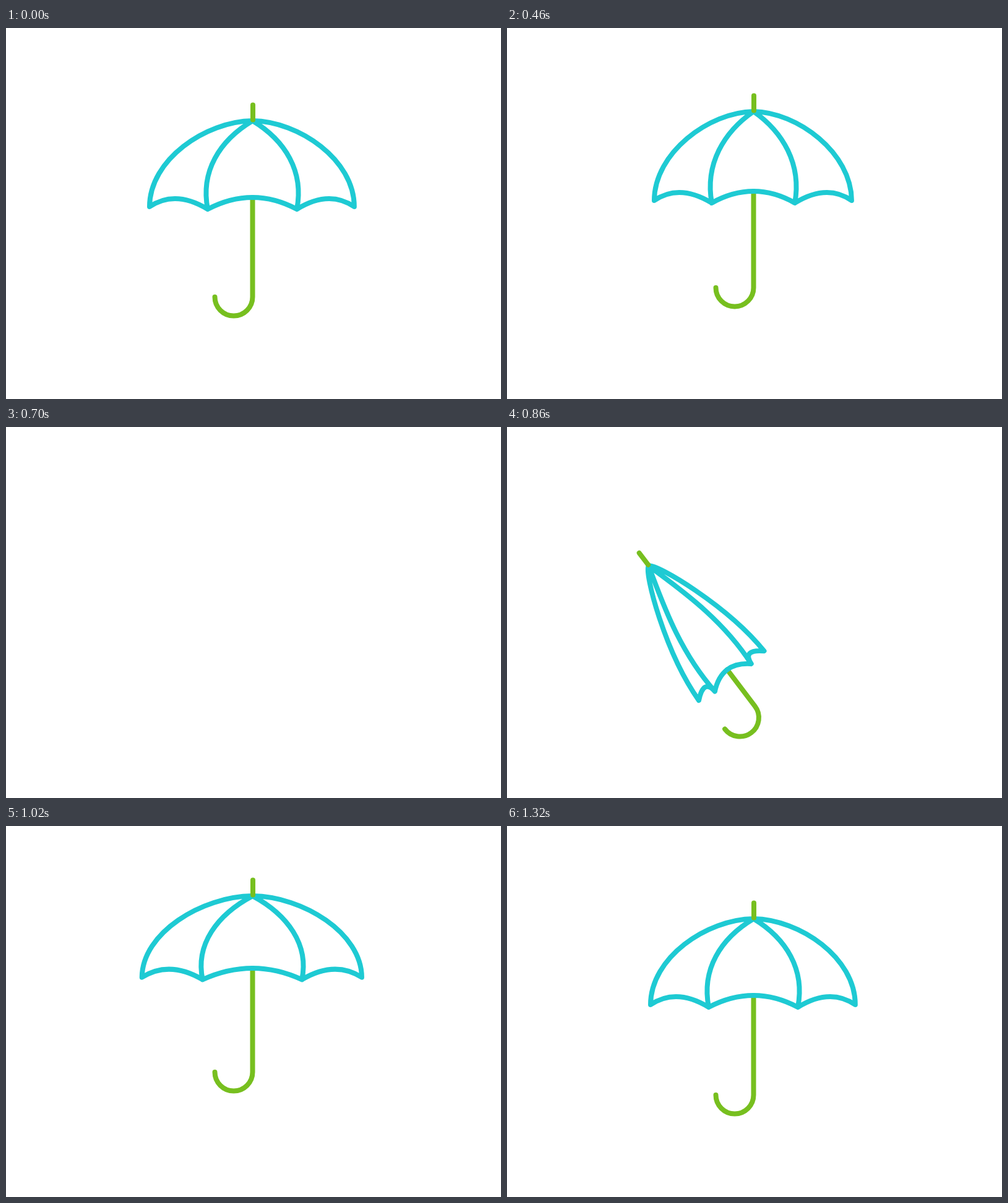
Recreate the animation shown at these times as an HTML page with a canvas. Size 800 by 600 pixels, loop 1.56 s.

```html
<!DOCTYPE html>
<html lang="en">
<head>
<meta charset="utf-8">
<title>Umbrella</title>
<style>
  html, body { margin: 0; width: 100%; height: 100%; overflow: hidden; background: #fff; }
  canvas { display: block; }
</style>
</head>
<body>
<canvas id="stage" width="800" height="600"></canvas>
<script>
const ctx = document.getElementById('stage').getContext('2d');
const LOOP = 1560, STEP = 20;
const BLUE = '#1ecad3', GREEN = '#77bf1f';
const APEX = { x: 398.5, y: 150 };
const HOOK = { x: -30.5, y: 285, r: 30.5 };
const PIVOT = { x: -30.5, y: 271 };

// Left half of the canopy, relative to its apex. Each pose lists:
// outer curve (2 controls, corner), rib (2 controls, end), side scallop control, middle scallop control y
const REST = [-76, 1, -166.5, 63, -166.5, 139, -53.5, 32, -84.5, 82, -72.5, 143, -125, 111, 105];
const WIDE = [-84, 1, -181, 59, -181.5, 130, -58, 30, -94, 78, -82, 133.5, -137, 102, 97];
const SHUT = [-45, 3, -116, 95, -117.5, 180, -30, 42, -60, 108, -51, 184, -83, 154, 149];

const mix = (a, b, p) => a + (b - a) * p;
const clamp = p => Math.max(0, Math.min(1, p));
const span = (t, a, b) => clamp((t - a) / (b - a));
const smooth = p => (1 - Math.cos(Math.PI * p)) / 2;
const glide = (t, t0, t1, a, b) => mix(a, b, smooth(span(t, t0, t1)));

// fold: 0 at rest, towards 1 closing, -1 fully spread
function stateAt(t) {
  if (t < 540) {
    const p = (t / 540) ** 3.4;
    return { dy: -26 * p, fold: 0.21 * p, tilt: 0 };
  }
  if (t < 700) {
    const p = span(t, 540, 700) ** 3;
    return { dy: mix(-26, 494, p), fold: glide(t, 540, 625, 0.21, -1), tilt: 0 };
  }
  if (t < 840) return null;
  const left = 1 - span(t, 820, 1000);
  const dy = t < 1000 ? -40 + 146 * left ** 2.5
    : t < 1120 ? glide(t, 1000, 1120, -40, 6.5)
    : glide(t, 1120, 1320, 6.5, 0);
  const fold = t < 940 ? 1 + 1.2 * Math.cos(Math.PI / 2 * span(t, 820, 940))
    : t < 1050 ? mix(1, -1, Math.sin(Math.PI / 2 * span(t, 940, 1050)))
    : t < 1120 ? glide(t, 1050, 1120, -1, 0.12)
    : glide(t, 1120, 1320, 0.12, 0);
  return { dy, fold, tilt: -62 * left ** 2.04 * Math.PI / 180 };
}

// the ribs draw together sooner than the rim
function poseAt(fold) {
  const goal = fold < 0 ? WIDE : SHUT;
  const p = Math.abs(fold), lead = p ** 0.7;
  const isRibX = i => i === 6 || i === 8 || i === 10;
  return REST.map((v, i) => mix(v, goal[i], isRibX(i) ? lead : p));
}

function stroke(color, trace) {
  ctx.strokeStyle = color;
  ctx.beginPath();
  trace();
  ctx.stroke();
}

function canopyHalf(k, side) {
  const q = k.map((v, i) => i % 2 || i === 14 ? v : v * side);
  const midY = (q[11] + q[14]) / 2;
  ctx.moveTo(0, 0);
  ctx.bezierCurveTo(...q.slice(0, 6));
  ctx.quadraticCurveTo(q[12], q[13], q[10], q[11]);
  ctx.moveTo(0, 0);
  ctx.bezierCurveTo(...q.slice(6, 12));
  ctx.quadraticCurveTo(q[10] / 2, midY, 0, midY);
}

function draw(t) {
  ctx.setTransform(1, 0, 0, 1, 0, 0);
  ctx.fillStyle = '#fff';
  ctx.fillRect(0, 0, 800, 600);
  const s = stateAt(t);
  if (!s) return;

  ctx.translate(APEX.x + PIVOT.x, APEX.y + PIVOT.y + s.dy);
  ctx.rotate(s.tilt);
  ctx.translate(-PIVOT.x, -PIVOT.y);
  ctx.lineWidth = 8;
  ctx.lineCap = ctx.lineJoin = 'round';

  const k = poseAt(s.fold);
  stroke(GREEN, () => {
    ctx.moveTo(0, (k[11] + k[14]) / 2);
    ctx.lineTo(0, HOOK.y);
    ctx.arc(HOOK.x, HOOK.y, HOOK.r, 0, Math.PI);
  });
  stroke(BLUE, () => {
    canopyHalf(k, 1);
    canopyHalf(k, -0.987);
  });
  stroke(GREEN, () => {
    ctx.moveTo(0.5, -25.5);
    ctx.lineTo(0.5, -1.5);
  });
}

const start = performance.now();
function tick() {
  const t = (performance.now() - start) % LOOP;
  draw(Math.floor(t / STEP) * STEP);
  requestAnimationFrame(tick);
}
tick();
</script>
</body>
</html>
```
